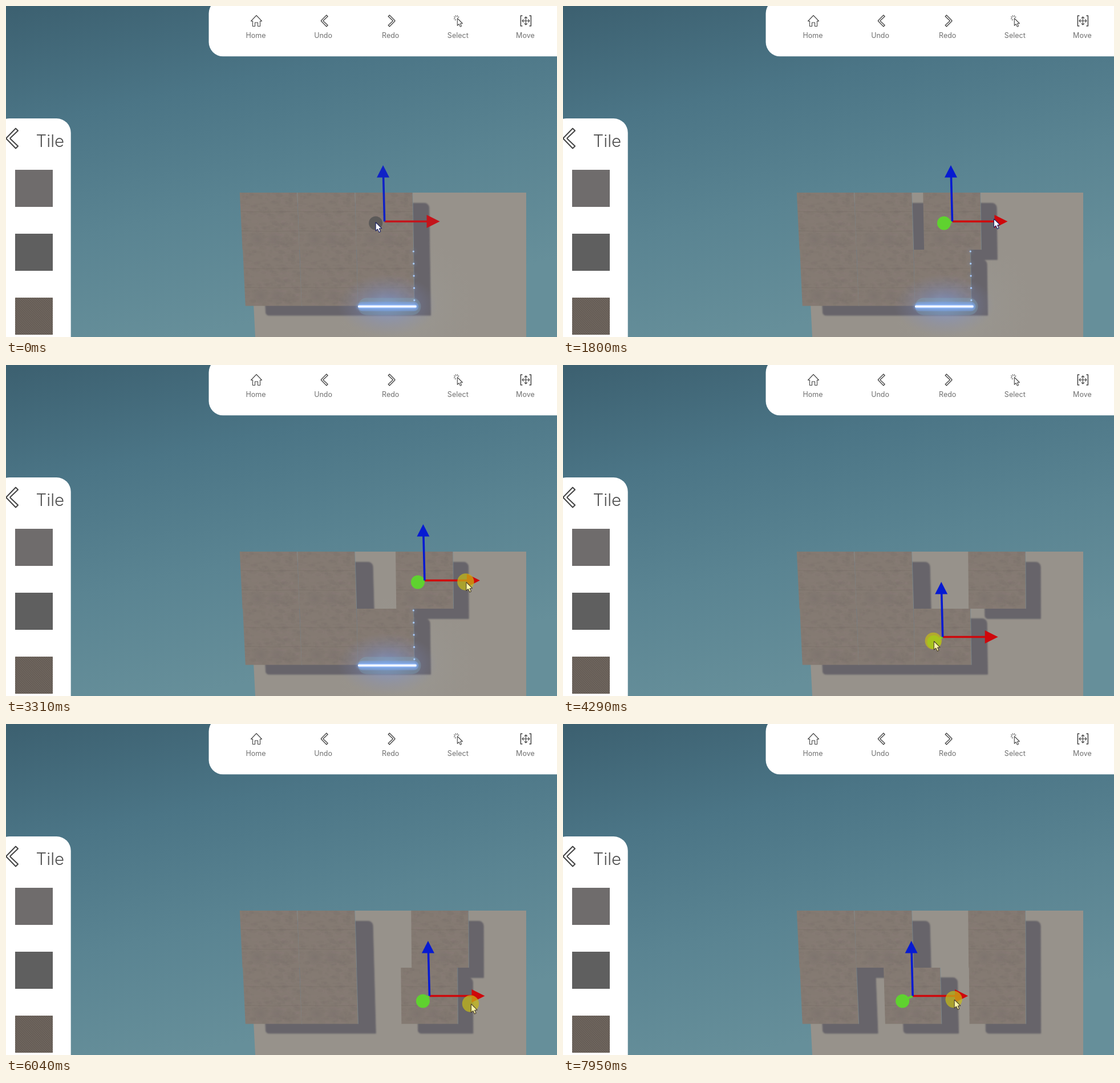
Recreate the animation shown at these times as an HTML page with a canvas. Size 966x580 px, loop 8 s.

```html
<!DOCTYPE html>
<html lang="en">
<head>
<meta charset="utf-8">
<title>Tile editor</title>
<style>
html, body { margin: 0; width: 100%; height: 100%; overflow: hidden; background: #4f7989; }
canvas { display: block; }
</style>
</head>
<body>
<canvas id="stage" width="966" height="580"></canvas>
<script>
const W = 966, H = 580, LOOP = 8000, TRAVEL = 560;
const LEFT = 409.5, TOP = 327, TILE_W = 101.2, ROWS = [TOP, 427, 525.5];
const ctx = document.getElementById('stage').getContext('2d');

// Tiles are numbered row by row. An act without a distance is a click on the tile's knob;
// the others drag the tile by its red arrow, held `grip` pixels below the shaft.
const acts = [
  { tile: 2, from: 0, to: 70, idle: true },
  { tile: 2, from: 960, to: 1790, dist: 19, grip: -4.5 },
  { tile: 2, from: 2130, to: 2520, dist: 19.5, grip: -4 },
  { tile: 2, from: 2990, to: 3870, dist: 59.5, grip: 3 },
  { tile: 5, from: 4130, to: 4450 },
  { tile: 5, from: 5300, to: 6560, dist: 98, grip: 14 },
  { tile: 4, from: 6850, to: 7050 },
  { tile: 4, from: 7450, to: 9000, dist: 98, grip: 6.5 },
];

const clamp = v => Math.min(1, Math.max(0, v));
const easeOut = v => Math.sin(clamp(v) * Math.PI / 2);
const smooth = v => (v = clamp(v)) * v * (3 - 2 * v);
const mix = (a, b, f) => a + (b - a) * f;

// Camera: vertical edges converge, and light from the upper left throws shadows on the floor
const slant = x => (834 - x) * 0.000125;
const project = (x, y) => [x + (y - TOP) * slant(x), y];
const cast = ([x, y]) => [x + 26 + (811 - x) * 0.025, y + 18.5 - (y - TOP) * 0.01];

function tileAt(index, t) {
  const row = Math.floor(index / 3);
  const slide = acts.filter(a => a.tile === index && a.dist)
    .reduce((sum, a) => sum + a.dist * easeOut((t - a.from) / (a.to - a.from)), 0);
  return { x: LEFT + index % 3 * TILE_W + slide, row };
}

function gizmoAt(tile) {
  const y = tile.row ? 476.5 : 377.5;
  const [x] = project(tile.x + TILE_W / 2, y);
  return { x, y, knobX: x - 18 + (x - 613) * 0.05, knobY: y + (tile.row ? 9 : 3) };
}

function handAt(act, t) {
  const g = gizmoAt(tileAt(act.tile, t));
  return act.dist ? [g.x + 73, g.y + act.grip] : [g.knobX, g.knobY - 1.5];
}

function pointerAt(t) {
  const i = acts.findLastIndex(a => a.from <= t), act = acts[i], next = acts[i + 1];
  if (t <= act.to || !next) return handAt(act, t);
  const f = smooth((t - act.to) / Math.min(TRAVEL, next.from - act.to));
  const end = handAt(next, t);
  return handAt(act, t).map((v, k) => mix(v, end[k], f));
}

function trace(points, g) {
  g.beginPath();
  points.forEach(p => g.lineTo(...p));
}
function poly(points, fill, g = ctx) {
  trace(points, g);
  g.fillStyle = fill;
  g.fill();
}
function line(points, color, width, g = ctx) {
  trace(points, g);
  g.strokeStyle = color;
  g.lineWidth = width;
  g.stroke();
}
function disc(x, y, r, fill) {
  ctx.beginPath();
  ctx.arc(x, y, r, 0, 7);
  ctx.fillStyle = fill;
  ctx.fill();
}
function box(x, y, w, h, fill, g = ctx) {
  g.fillStyle = fill;
  g.fillRect(x, y, w, h);
}
function gradient(g, ...colors) {
  colors.forEach((c, i) => g.addColorStop(i / (colors.length - 1), c));
  return g;
}
function layer(w, h, paint) {
  const c = document.createElement('canvas');
  c.width = w;
  c.height = h;
  if (paint) paint(c.getContext('2d'));
  return c;
}

let seed = 7;
const random = () => (seed = (seed * 16807) % 2147483647) / 2147483647;

const stone = layer(101, 100, g => {
  box(0, 0, 101, 100, '#847a72', g);
  for (let i = 0; i < 300; i++) {
    g.fillStyle = i % 2 ? 'rgba(158,143,130,.045)' : 'rgba(90,82,80,.035)';
    g.beginPath();
    g.ellipse(random() * 101, random() * 100, 2 + random() * 6, 1 + random() * 3, 0, 0, 7);
    g.fill();
  }
  for (const x of [28, 58]) {
    box(0, 60, 101, 40, gradient(g.createRadialGradient(x, 82, 0, x, 82, 16), 'rgba(98,92,94,.2)', 'rgba(98,92,94,0)'), g);
  }
  for (const y of [33, 67]) line([[0, y], [50, y + 1], [101, y]], 'rgba(92,82,75,.17)', 1, g);
});

const weave = layer(66, 65, g => {
  box(0, 0, 66, 65, '#6c635c', g);
  for (let x = -66; x < 132; x += 4) {
    line([[x, 0], [x + 65, 65]], 'rgba(62,56,52,.3)', 1, g);
    line([[x, 0], [x - 65, 65]], 'rgba(135,122,112,.22)', 1, g);
  }
});

const shade = layer(W, H), shadeCtx = shade.getContext('2d');

function addShadow(tile, tiles) {
  const { x, row } = tile, g = shadeCtx;
  const y0 = ROWS[row], y1 = ROWS[row + 1];
  const [a, b, c, d] = [[x, y0], [x + TILE_W, y0], [x + TILE_W, y1], [x, y1]].map(p => cast(project(...p)));
  const near = (r, edge) => tiles.some(o => o.row === r && Math.abs(o.x - edge) < 5);
  g.beginPath();
  g.moveTo(...a);
  g.arcTo(...b, ...c, near(row - 1, x) ? 0 : 8);
  g.lineTo(...c);
  g.arcTo(...d, ...a, near(row, x - TILE_W) ? 0 : 5);
  g.closePath();
  g.fill();
  g.stroke();
}

function drawShadows(tiles) {
  shadeCtx.clearRect(0, 0, W, H);
  shadeCtx.fillStyle = shadeCtx.strokeStyle = '#67646a';
  tiles.forEach(tile => addShadow(tile, tiles));
  ctx.save();
  ctx.filter = 'blur(1.2px)';
  ctx.drawImage(shade, 0, 0);
  ctx.restore();
}

function drawTile({ x, row }) {
  const y0 = ROWS[row], y1 = ROWS[row + 1], mid = (y0 + y1) / 2;
  ctx.save();
  ctx.transform(1, 0, slant(x + TILE_W / 2), 1, project(x, mid)[0], mid);
  ctx.drawImage(stone, 0, y0 - mid, TILE_W * (1 - (mid - TOP) * 0.000125), y1 - y0);
  ctx.restore();
  line([project(x + TILE_W, y0), project(x + TILE_W, y1)], 'rgba(118,148,162,.5)', 1);
}

function drawScene(tiles, lit) {
  box(0, 0, W, H, gradient(ctx.createLinearGradient(0, 0, 130, 620), '#3c6070', '#4b7586', '#5a8492', '#668f9a'));
  poly([[424, TOP], [912, TOP], [912, H], [437, H]], '#97928b');
  if (lit) {
    box(560, 400, 300, 180, gradient(ctx.createRadialGradient(700, 525, 20, 700, 525, 125),
      'rgba(160,165,165,.25)', 'rgba(158,157,148,0)'));
  }
  drawShadows(tiles);
  tiles.forEach(drawTile);
}

function drawLamp() {
  ctx.save();
  ctx.translate(668, 524);
  ctx.scale(1, 0.62);
  box(-90, -90, 180, 180, gradient(ctx.createRadialGradient(0, 0, 8, 0, 0, 88),
    'rgba(125,155,220,.65)', 'rgba(125,142,200,.3)', 'rgba(130,135,175,0)'));
  ctx.restore();
  ctx.save();
  ctx.lineCap = 'round';
  const bar = (color, width) => line([[603 + width / 2 + 14, 526.5], [718.5 - width / 5, 526.5]], color, width);
  bar('rgba(130,175,195,.3)', 30);
  bar('rgba(120,165,235,.45)', 16);
  ctx.shadowColor = '#86b0f5';
  ctx.shadowBlur = 6;
  bar('#9dc2ff', 6);
  bar('#ffffff', 3.5);
  for (let i = 0; i < 5; i++) disc(714.3 + i * 0.4, 430 + i * 21.4, 1.6, '#a9ccff');
  ctx.restore();
}

function drawGizmo(tile, active) {
  const { x, y, knobX, knobY } = gizmoAt(tile);
  const red = active ? '#cf070b' : '#c4141b', blue = active ? '#061ad2' : '#1022c6';
  const tip = y - (tile.row ? 96.5 : 98.5);
  if (active) line([[x, y], [knobX, knobY]], '#5bd32d', 4);
  disc(knobX, knobY, 12, active ? '#5fd22f' : '#5c5a59');
  line([[x, y], [x + 76, y]], red, 3.4);
  poly([[x + 74, y - 11.5], [x + 97, y], [x + 74, y + 11.5]], red);
  line([[x, y], [x - 2, tip + 20]], blue, 3.6);
  poly([[x - 2.5, tip], [x + 8.5, tip + 21.5], [x - 13.5, tip + 21.5]], blue);
}

function arrow(x, y, scale, fill, ink) {
  const points = [[0, 0], [0, 15], [3.4, 12], [6, 17.5], [8.6, 16.3], [6.2, 11], [10.6, 10.6], [0, 0]]
    .map(([px, py]) => [x + px * scale, y + py * scale]);
  poly(points, fill);
  line(points, ink, 1.1);
}

function drawPointer([x, y], pressed) {
  if (pressed) disc(x - 1, y - 0.5, 14.7, 'rgba(200,188,20,.7)');
  arrow(x, y, 1, pressed ? '#fff8a8' : '#ffffff', pressed ? '#4a4030' : '#1b2368');
}

// Hollow chevron; dir -1 points left
function chevron(x, y, w, h, band, dir, width) {
  const half = [[-w, 0], [w - band, h], [w, h - band], [band * 1.7 - w, 0]];
  for (const side of [-1, 1]) line(half.map(([px, py]) => [x - dir * px, y + side * py]), '#444444', width);
}

function drawIcons(slot) {
  const ink = '#444444';
  ctx.lineJoin = 'round';
  for (const d of [-1, 1]) {
    const home = slot(0) + 1, move = slot(4) + 1, end = 26 + d * 7;
    line([[0, 16.5], [9.5, 26.5], [6.5, 26.5], [6.5, 35.5], [2.5, 35.5], [2.5, 29], [0, 29]].map(([x, y]) => [home + d * x, y]), ink, 1.1);
    line([[6, 17], [9, 17], [9, 35], [6, 35]].map(([x, y]) => [move + d * x, y]), ink, 1.5);
    line([[move, 26], [move + d * 6, 26]], ink, 1.1);
    line([[move, 26], [move, end]], ink, 1.1);
    line([[move + d * 4, 23.5], [move + d * 6.5, 26], [move + d * 4, 28.5]], ink, 1.1);
    line([[move - 2.5, end - d * 2.5], [move, end], [move + 2.5, end - d * 2.5]], ink, 1.1);
    chevron(slot(d < 0 ? 1 : 2) + 2, 26, 6, 10, 2.2, d, 1.3);
  }
  arrow(slot(3) - 1, 21.5, 0.85, '#ffffff', ink);
  for (let i = 0; i < 6; i++) {
    const a = 2.1 + i * 0.75, ray = r => [slot(3) - 2.5 + Math.cos(a) * r, 21 + Math.sin(a) * r];
    line([ray(2.5), ray(5)], ink, 1.1);
  }
  chevron(10.5, 232, 10.5, 17.5, 4, -1, 2);
}

function panel(x, y, w, h) {
  ctx.beginPath();
  ctx.roundRect(x, y, w, h, 25);
  ctx.fillStyle = '#ffffff';
  ctx.fill();
}

function drawPanels() {
  const slot = i => 438 + i * 118.1;
  panel(355.5, -12, 660, 100.3);
  panel(-19, 197, 132.7, 430);
  drawIcons(slot);
  ctx.textAlign = 'center';
  ctx.fillStyle = '#707070';
  ctx.font = '12.5px Inter, sans-serif';
  ['Home', 'Undo', 'Redo', 'Select', 'Move'].forEach((s, i) => ctx.fillText(s, slot(i), 55.7));
  ctx.textAlign = 'left';
  ctx.fillStyle = '#505050';
  ctx.font = '300 29.5px Inter, sans-serif';
  ctx.fillText('Tile', 52.5, 247.3);
  box(16, 287, 66, 65, '#6f6c6c');
  box(16, 399, 66, 65, '#5f5f5f');
  ctx.drawImage(weave, 16, 511);
}

function draw(t) {
  const tiles = Array.from({ length: 6 }, (_, i) => tileAt(i, t));
  const act = acts.findLast(a => a.from <= t);
  const lit = act.tile === 2;
  drawScene(tiles, lit);
  if (lit) drawLamp();
  drawGizmo(tiles[act.tile], !act.idle);
  drawPointer(pointerAt(t), !act.idle && t <= act.to);
  drawPanels();
}

const start = performance.now();
function tick() {
  draw((performance.now() - start) % LOOP);
  requestAnimationFrame(tick);
}
tick();
</script>
</body>
</html>
```
